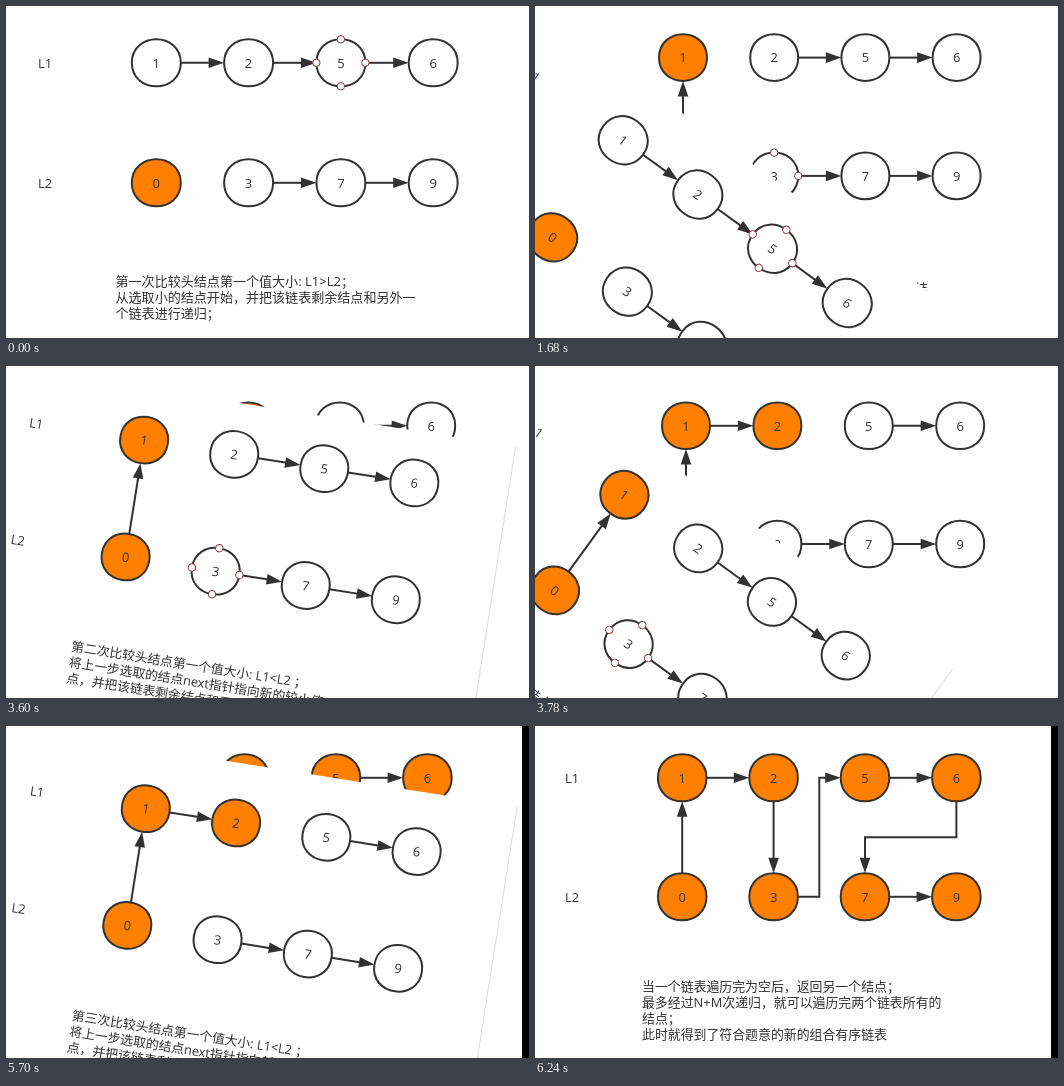
An HTML page with a canvas for the animation above (6.8 s loop, 523 px wide and 332 px high).

```html
<!DOCTYPE html>
<html lang="zh-CN">
<head>
<meta charset="utf-8">
<title>合并有序链表</title>
<style>
html, body { margin: 0; width: 100%; height: 100%; overflow: hidden; background: #fefefe; }
canvas { display: block; }
</style>
</head>
<body>
<canvas id="stage" width="523" height="332"></canvas>
<script>
const W = 523, H = 332, INK = '#323232', PAPER = '#fefefe', ORANGE = '#ff8000';
const ROWS = ['1256', '0379'];
const ctx = document.getElementById('stage').getContext('2d');

// x, y: centre of the first node; dx, dy: node spacing; tx, ty: text origin
const slides = [
  { w: W, x: 150.3, y: 56.8, dx: 92.3, dy: 120, rx: 24.5, ry: 23.5, size: 13.05, label: 32,
    on: '0', picked: '5', links: '12 25 56 37 79', tx: 109.5, ty: 280, lead: 16.2,
    text: ['第一次比较头结点第一个值大小: L1>L2；',
           '从选取小的结点开始，并把该链表剩余结点和另外一',
           '个链表进行递归；'] },
  { w: 516.5, edge: true, x: 148, y: 51.6, dx: 91.2, dy: 118.3, rx: 24, ry: 23.3, size: 12.85, label: 32,
    on: '01', picked: '3', links: '01 25 56 37 79', tx: 108.5, ty: 271, lead: 16,
    text: ['第二次比较头结点第一个值大小: L1<L2 ；',
           '将上一步选取的结点next指针指向新的较小值L2结',
           '点，并把该链表剩余结点和另外一个链表进行递归；'] },
  { w: 518, edge: true, x: 151, y: 59.8, dx: 91.4, dy: 118.2, rx: 24, ry: 23.3, size: 12.9, label: 34,
    on: '012', links: '01 12 56 37 79', tx: 110.5, ty: 280, lead: 16,
    text: ['第三次比较头结点第一个值大小: L1<L2 ；',
           '将上一步选取的结点next指针指向新的较小值L2结',
           '点，并把该链表剩余结点和另外一个链表进行递归；'] },
  { w: 516, x: 147.2, y: 51.8, dx: 91.4, dy: 119, rx: 24.3, ry: 23.5, size: 12.9, label: 30,
    on: '01256379', links: '01 12 23 35 56 67 79', tx: 107, ty: 265, lead: 16,
    text: ['当一个链表遍历完为空后，返回另一个结点；',
           '最多经过N+M次递归，就可以遍历完两个链表所有的',
           '结点；',
           '此时就得到了符合题意的新的组合有序链表'] }
];

function place(s, digit) {
  const row = ROWS[0].includes(digit) ? 0 : 1;
  return [s.x + s.dx * ROWS[row].indexOf(digit), s.y + s.dy * row];
}

function write(str, x, y, align = 'left') {
  ctx.fillStyle = INK;
  ctx.textAlign = align;
  ctx.fillText(str, x, y);
}

function route(s, from, to) {
  const [ax, ay] = place(s, from), [bx, by] = place(s, to);
  const mx = (ax + bx) / 2, my = (ay + by) / 2;
  if (bx > ax) {
    const start = [ax + s.rx, ay], end = [bx - s.rx, by];
    return ay === by ? [start, end] : [start, [mx, ay], [mx, by], end];
  }
  const dir = Math.sign(by - ay);
  const start = [ax, ay + dir * s.ry], end = [bx, by - dir * s.ry];
  return ax === bx ? [start, end] : [start, [ax, my], [bx, my], end];
}

function arrow(points) {
  const [px, py] = points.at(-2), [x, y] = points.at(-1);
  const ux = Math.sign(x - px), uy = Math.sign(y - py);
  ctx.beginPath();
  points.slice(0, -1).forEach(p => ctx.lineTo(...p));
  ctx.lineTo(x - 12 * ux, y - 12 * uy);
  ctx.stroke();
  ctx.beginPath();
  ctx.moveTo(x, y);
  for (const side of [-5.3, 5.3]) ctx.lineTo(x - 15.5 * ux + side * uy, y - 15.5 * uy + side * ux);
  ctx.fillStyle = INK;
  ctx.fill();
}

function node(s, digit) {
  const [x, y] = place(s, digit), { rx, ry } = s, bulge = ry * 4 / 3;
  ctx.beginPath();
  ctx.moveTo(x - rx, y);
  ctx.bezierCurveTo(x - rx, y - bulge, x + rx, y - bulge, x + rx, y);
  ctx.bezierCurveTo(x + rx, y + bulge, x - rx, y + bulge, x - rx, y);
  ctx.closePath();
  ctx.fillStyle = s.on.includes(digit) ? ORANGE : PAPER;
  ctx.fill();
  ctx.stroke();
  write(digit, x, y + 4.8, 'center');
}

function handles(s) {
  const [x, y] = place(s, s.picked);
  ctx.strokeStyle = '#833';
  ctx.lineWidth = 1;
  ctx.fillStyle = '#fff';
  for (const [i, j] of [[0, -1], [1, 0], [0, 1], [-1, 0]]) {
    ctx.beginPath();
    ctx.arc(x + i * s.rx, y + j * s.ry, 3.7, 0, 7);
    ctx.fill();
    ctx.stroke();
  }
}

function drawSlide(s) {
  ctx.fillStyle = PAPER;
  ctx.fillRect(0, 0, s.w, H);
  ctx.font = `${s.size}px "Open Sans", "Noto Sans CJK SC", "Noto Sans CJK", sans-serif`;
  ctx.strokeStyle = INK;
  ctx.lineWidth = 2;
  for (const [from, to] of s.links.split(' ')) arrow(route(s, from, to));
  for (const digit of ROWS.join('')) node(s, digit);
  if (s.picked) handles(s);
  ['L1', 'L2'].forEach((name, i) => write(name, s.label, s.y + i * s.dy + 5));
  s.text.forEach((line, i) => write(line, s.tx, s.ty + i * s.lead));
}

function frame(now) {
  const t = now % 6800, i = Math.floor(t / 2100), local = t % 2100;
  const step = local < 1500 ? 0 : Math.floor((local - 1500) / 60) + 1;
  const s = slides[i], next = slides[i + 1];
  const below = step ? next : s;
  ctx.fillStyle = below === slides[3] ? '#000' : PAPER;
  ctx.fillRect(0, 0, W, H);
  drawSlide(below);
  // The old slide swings away about the top left corner
  if (step && step < 10) {
    ctx.save();
    ctx.rotate(step * Math.PI / 20);
    drawSlide(s);
    if (s.edge) {
      ctx.fillStyle = '#ddd';
      ctx.fillRect(s.w - 1, 0, 1, H);
    }
    ctx.restore();
  }
  requestAnimationFrame(frame);
}
requestAnimationFrame(frame);
</script>
</body>
</html>
```
